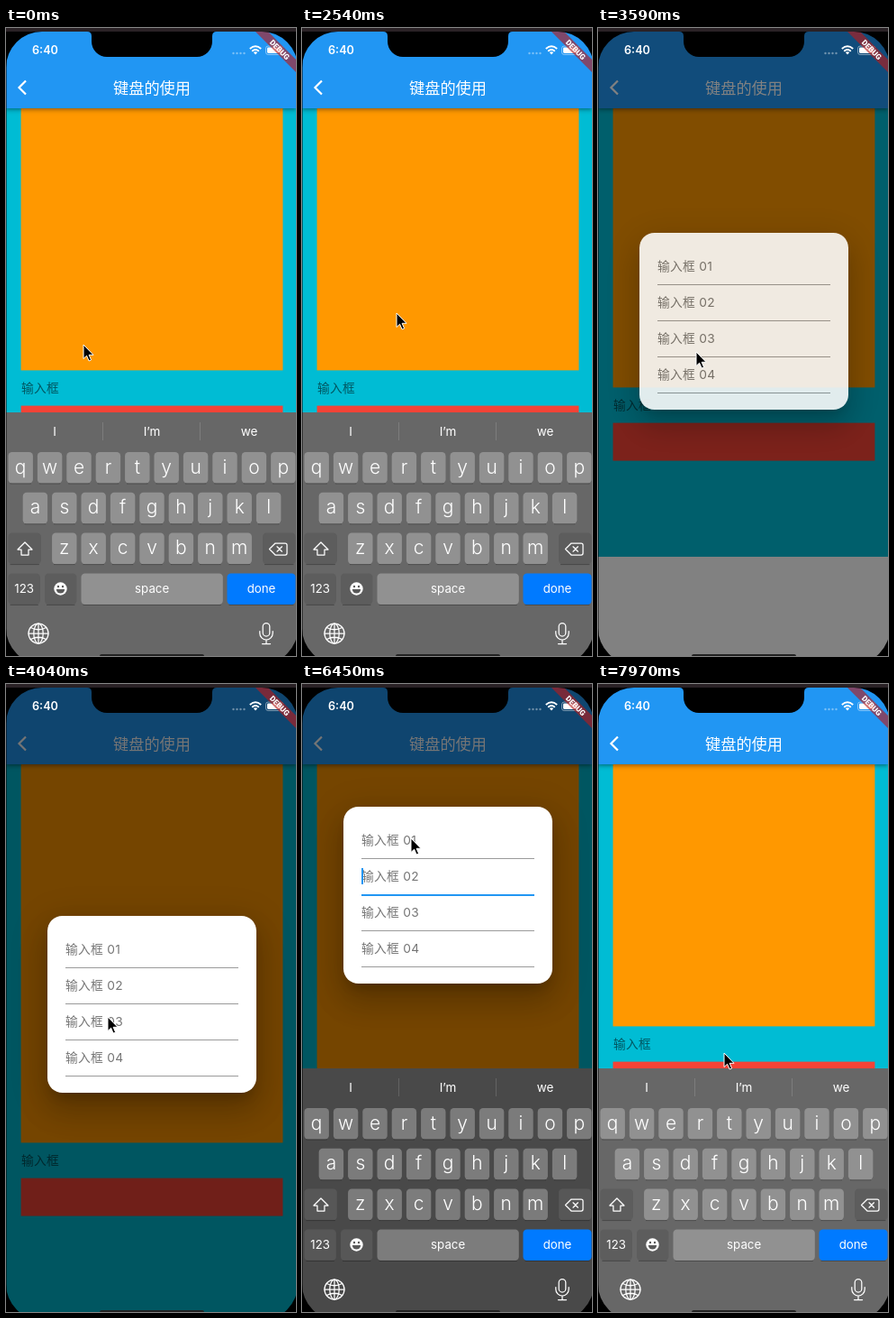
Recreate the animation shown at these times as an HTML page. Size 322 by 696 pixels, loop 8000 ms.

```html
<!DOCTYPE html>
<html lang="zh">
<head>
<meta charset="utf-8">
<style>
html, body { margin: 0; width: 100%; height: 100%; overflow: hidden; background: #000; }
#stage { position: absolute; left: 0; top: 0; width: 322px; height: 696px; overflow: hidden; background: #fff; font: 13.74px/20px Inter, "Noto Sans CJK SC", "Noto Sans CJK", sans-serif; letter-spacing: .3px; }
#stage div, #stage svg { position: absolute; }
#page { left: 0; top: 89px; width: 322px; overflow: hidden; background: #00bcd4; }
#content svg { left: 0; top: 0; overflow: visible; }
#label { left: 17px; top: 300px; color: rgba(0,0,0,.54); white-space: nowrap; }
#bar { left: 0; top: 0; width: 322px; height: 89px; background: #2196f3; box-shadow: 0 2px 3px -1px rgba(0,0,0,.2), 0 3px 4px rgba(0,0,0,.14), 0 1px 8px rgba(0,0,0,.12); color: #fff; }
#title { top: 56px; width: 324px; text-align: center; letter-spacing: 0; font-size: 17.2px; font-weight: 500; font-family: "Noto Sans CJK SC", "Noto Sans CJK", sans-serif; }
#barrier { width: 322px; height: 696px; background: #000; }
#dialog { left: 46px; width: 232px; height: 196px; border-radius: 16.6px; background: #fff; box-shadow: 0 9px 13px -6px rgba(0,0,0,.2), 0 20px 32px 3px rgba(0,0,0,.14), 0 8px 38px 7px rgba(0,0,0,.12); }
.field { left: 20px; width: 192px; height: 30px; color: #757575; border-bottom: 1px solid #9a9a9a; white-space: nowrap; }
.field.on { border-bottom: 2px solid #2196f3; }
.caret { left: 0; top: 1px; width: 1.6px; height: 18px; background: #2196f3; }
#kb { left: 0; width: 322px; height: 276px; background: rgba(62,62,62,.783); backdrop-filter: blur(8px); letter-spacing: 0; }
#kb svg { left: 0; top: 0; }
</style>
</head>
<body>
<div id="stage">
  <div id="page">
    <div id="content">
      <svg width="322" height="400">
        <rect x="16.6" y="-140" width="290.8" height="430.4" fill="#ff9800"/>
        <rect x="16.6" y="329.6" width="290.8" height="42" fill="#f44336"/>
      </svg>
      <div id="label">输入框<div class="caret"></div></div>
    </div>
  </div>
  <div id="bar">
    <svg width="40" height="89" fill="none" stroke="#fff" stroke-width="2.2"><path d="M22 58.5 14.5 66 22 73.5"/></svg>
    <div id="title">键盘的使用</div>
  </div>
  <div id="barrier"></div>
  <div id="dialog"></div>
  <div id="kb"></div>
  <svg width="322" height="696" font-family="Inter, sans-serif" letter-spacing="0">
    <g fill="#fff">
      <text x="29" y="29.2" font-size="12.7" font-weight="600">6:40</text>
      <path d="M252.5 28h13" stroke="#fff" stroke-opacity=".4" stroke-width="2.4" stroke-linecap="round" stroke-dasharray="0 4"/>
      <path d="M277 29.5l-2.2-2.4q2.2-1.8 4.4 0z"/>
      <path d="M273.2 25.7q3.8-3.2 7.6 0M270.8 22.9q6.2-5.2 12.4 0" fill="none" stroke="#fff" stroke-width="1.9"/>
      <rect x="288.5" y="20" width="19" height="9.5" rx="2.6" fill="none" stroke="#fff" stroke-opacity=".45"/>
      <rect x="290" y="21.5" width="16" height="6.5" rx="1.4"/>
    </g>
    <g transform="translate(324 4) rotate(45)">
      <rect x="-40" y="23.3" width="80" height="10" fill="#b71c1c" fill-opacity=".63"/>
      <text y="31.4" font-size="8.5" font-weight="900" font-family="Roboto, sans-serif" text-anchor="middle" fill="#fff">DEBUG</text>
    </g>
    <rect x="104" y="694" width="116" height="4.2" rx="2.1" fill="#222"/>
    <path fill-rule="evenodd" d="M-1 0H326V710H-1ZM40 4a40 40 0 0 0-40 40V665a40 40 0 0 0 40 40H284a40 40 0 0 0 40-40V44a40 40 0 0 0-40-40Z"/>
    <path d="M90 4q5 0 5 5v6a17 17 0 0 0 17 17h100a17 17 0 0 0 17-17v-6q0-5 5-5z"/>
    <path d="M0 0H322V4H0Z" fill="#2a2226"/>
    <path d="M0 4H1V696H0Z" fill-opacity=".5"/>
    <path id="pointer" d="M0 0V15.5L3.6 12.2 6.1 18 8.6 16.9 6.1 11.3H11Z" stroke="#fff"/>
  </svg>
</div>
<script>
const $ = id => document.getElementById(id);
const all = selector => [...document.querySelectorAll(selector)];

// Keyboard: columns and rows sit on one grid
const PITCH = 32.4, ROW = 44.8, KEY = 27.4;
const LIGHT = 'rgba(255,255,255,.28)', DARK = 'rgba(90,90,90,.8)';
const text = (x, y, size, s, weight = 400) =>
  `<text x="${x}" y="${y}" font-size="${size}" font-weight="${weight}" text-anchor="middle">${s}</text>`;
const key = (col, row, w, fill, label = '', size = 13.3, weight = 400) => {
  const x = 2.5 + col * PITCH, y = 44 + row * ROW;
  return `<rect x="${x}" y="${y}" width="${w}" height="34.6" rx="4.2" fill="${fill}"/>
    <path d="M${x + 2} ${y + 35}h${w - 4}" stroke="#000" stroke-opacity=".3"/>` +
    text(x + w / 2, y + 17 + size * .31, size, label, weight);
};
const suggestion = (x, solid, soft) => text(x, 26, 13.5, `${solid}<tspan class="soft">${soft}</tspan>`);

let art = suggestion(54, '', 'I') + suggestion(162, 'I’', 'm') + suggestion(270, 'w', 'e') +
  '<path d="M107.5 11v20M215.5 11v20" stroke="#fff" stroke-opacity=".15"/>';
['qwertyuiop', 'asdfghjkl', 'zxcvbnm'].forEach((letters, row) =>
  [...letters].forEach((c, i) => {
    art += key(i + row * (row + 1) / 4, row, KEY, LIGHT, c, 21, 300);
  }));
art += key(0, 2, 36.4, DARK) + key(8.72, 2, 36.4, DARK) +
  key(0, 3, 35.4, DARK, '123') + key(1.25, 3, 35.4, DARK) +
  key(2.5, 3, 157.3, LIGHT, 'space') + key(7.5, 3, 76, '#007aff', 'done') +
  `<g fill="none" stroke="#fff" stroke-width="1.25" stroke-linejoin="round" stroke-linecap="round">
    <path d="M21 144l8 8h-4v6h-8v-6h-4z"/>
    <path d="M299 145h11q2 0 2 2v9q0 2-2 2h-11l-6.5-6.5zM301 148.8l5.4 5.4m0-5.4l-5.4 5.4"/>
    <circle cx="36" cy="245" r="11"/><ellipse cx="36" cy="245" rx="5.2" ry="11"/>
    <path d="M36 234v22M25 245h22M27.5 238.5q8.5 4.5 17 0M27.5 251.5q8.5-4.5 17 0"/>
    <rect x="285.2" y="233.5" width="7.6" height="14.5" rx="3.8"/>
    <path d="M281.8 242.5v2.3a7.2 7.2 0 0 0 14.4 0v-2.3M289 252v4.5M284.5 256.5h9"/>
  </g>
  <circle cx="60.5" cy="195.5" r="7.2"/>
  <g fill="#5a5a5a"><circle cx="58" cy="193" r="1.2"/><circle cx="63" cy="193" r="1.2"/><path d="M55.8 196h9.4q-.6 4.6-4.7 4.6t-4.7-4.6z"/></g>`;
$('kb').innerHTML = `<svg width="322" height="276" fill="#fff" font-family="Inter, sans-serif">${art}</svg>`;

$('dialog').innerHTML = [1, 2, 3, 4].map(n =>
  `<div class="field" style="top:${40 * n - 13}px">输入框 0${n}<div class="caret"></div></div>`).join('');
const fields = all('.field'), carets = all('.caret'), soft = all('.soft');

// Each pointer move: start time and destination
const MOVE = 450;
const moves = [[140, 113, 392], [2090, 105, 316], [3140, 109, 359], [3590, 113, 369],
  [4690, 113, 313], [5140, 116, 209], [5740, 121, 171], [6440, 304, 370], [7310, 140, 409]];
// Focus changes: 0 is the page field, 1 to 4 are in the dialog
const focuses = [[0, -1], [590, 0], [2690, -1], [4190, 3], [5440, 2], [6590, 1], [7310, 0]];

const ramp = (t, start, length) => Math.min(1, Math.max(0, (t - start) / length));
const smooth = (t, start, length) => {
  const p = ramp(t, start, length);
  return p * p * (3 - 2 * p);
};

function draw(now) {
  const t = Math.max(0, Math.floor((now % 8000 + 10) / 150) * 150 - 10);
  // The app stalls while the dialog opens; keyboard and pointer carry on
  const app = t > 2990 && t < 3740 ? 2990 : t;

  const settle = ramp(app, 2840, 150), grow = ramp(app, 2990, 150);
  const raise = ramp(app, 4190, 150), close = ramp(app, 7010, 300);
  const open = 1 - (1 - ramp(app, 2690, 420)) ** 2;
  const hidden = smooth(t, 2720, 340) - smooth(t, 4040, 315);

  $('barrier').style.opacity = .54 * open * (1 - close);
  $('dialog').style.opacity = ramp(app, 2690, 340) * (1 - close);
  $('dialog').style.top = 122 + 105 * settle + 30 * grow - 121 * raise + 'px';
  $('content').style.top = 19 * settle + 110 * grow - 129 * close + 'px';
  $('page').style.height = 337 + (app > 2690) * 160 + 110 * grow - 270 * raise + 'px';
  $('kb').style.top = 426 + 276 * hidden + 'px';
  soft.forEach(s => s.setAttribute('opacity', Math.max(.3, 1 - 2.3 * hidden)));

  let x = 86, y = 351;
  for (const [start, toX, toY] of moves) {
    const p = smooth(t, start - 1, MOVE);
    x += (toX - x) * p;
    y += (toY - y) * p;
  }
  $('pointer').setAttribute('transform', `translate(${x} ${y})`);

  const [since, focus] = focuses.filter(f => f[0] <= t).pop();
  fields.forEach((f, i) => f.classList.toggle('on', i + 1 === focus));
  carets.forEach((c, i) => c.style.opacity = +(i === focus && (t - since) % 1000 < 500));
  requestAnimationFrame(draw);
}
requestAnimationFrame(draw);
</script>
</body>
</html>
```
